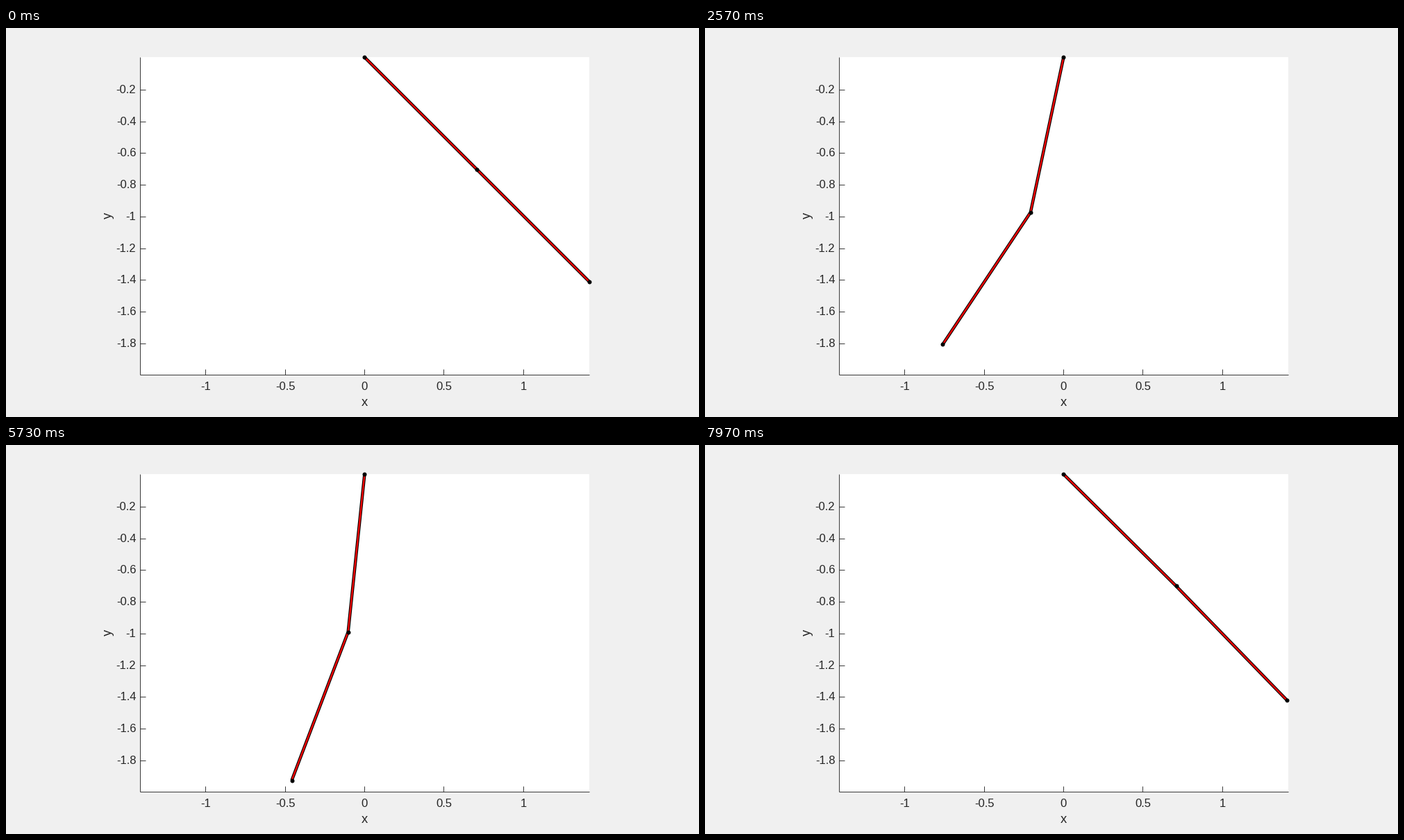
Recreate the animation shown at these times as a matplotlib script. Size 998 by 561 pixels, loop 8000 ms.

```python
import numpy as np
import matplotlib.pyplot as plt
from matplotlib.animation import FuncAnimation

W, H, DPI = 998, 561, 100
POSES, LOOP_MS, TICK_MS = 240, 8000, 20
G, STEP, SUBSTEPS = 9.81, 0.01, 4
X0, Y0, UNIT = 516.4, 42.2, 228.7
INK = "#262626"


def px(size):
    """Pixels to points."""
    return size * 72 / DPI


def slope(s):
    """Double pendulum of two equal uniform rods, one unit long."""
    a, b, u, v = s
    c, d = np.cos(a - b) / 2, np.sin(a - b) / 2
    mass = [[4 / 3, c], [c, 1 / 3]]
    force = [-d * v * v - 1.5 * G * np.sin(a), d * u * u - 0.5 * G * np.sin(b)]
    return np.array([u, v, *np.linalg.solve(mass, force)])


def simulate():
    s = np.array([np.pi / 4, np.pi / 4, 0, 0])
    h = STEP / SUBSTEPS
    angles = []
    for _ in range(POSES):
        angles.append(s[:2])
        for _ in range(SUBSTEPS):
            k1 = slope(s)
            k2 = slope(s + h / 2 * k1)
            k3 = slope(s + h / 2 * k2)
            k4 = slope(s + h * k3)
            s = s + h / 6 * (k1 + 2 * k2 + 2 * k3 + k4)
    return np.array(angles)


fig = plt.figure(figsize=(W / DPI, H / DPI), dpi=DPI, facecolor="#f0f0f0")
ax = fig.add_axes([0, 0, 1, 1])
ax.set(xlim=(0, W), ylim=(H, 0))
ax.axis("off")

# Plot area
left, right, bottom = 193.5, 839.8, 499.5
ax.fill([193, right, right, 193], [42, 42, 500, 500], color="white", lw=0)


def rule(xs, ys):
    ax.plot(xs, ys, color=INK, lw=px(0.9), solid_capstyle="butt")


def label(x, y, text, size=16.67, **kw):
    ax.text(x, y, text, family="Liberation Sans", size=px(size), color=INK,
            va="baseline", **kw)


rule([left, left], [42, 500])
rule([193, right], [bottom, bottom])
for value in np.arange(-2, 3) / 2:
    x = np.floor(X0 + value * UNIT) + 0.5
    rule([x, x], [bottom, bottom - 8])
    label(x, 522, f"{value:g}", ha="center")
for value in np.arange(-9, 0) / 5:
    y = np.round(Y0 - value * UNIT) + 0.5
    rule([left, left + 8], [y, y])
    label(187.3, y + 5.5, f"{value:g}", ha="right")
label(516.5, 545, "x", 18.33, ha="center")
label(152, 270.5, "y", 18.33, ha="center", rotation=90, rotation_mode="anchor")

# Rods and joints
edge, = ax.plot([], [], color="black", lw=px(4.5), solid_capstyle="butt")
core, = ax.plot([], [], color="#f00000", lw=px(2.4), solid_capstyle="butt")
dots, = ax.plot([], [], "o", color="black", ms=px(6), mew=0)

angles = simulate()


def draw(tick):
    # Poses change on a 10 ms clock, rounded to the nearest
    i = int((tick * TICK_MS + 15) * POSES / LOOP_MS)
    xs = X0 + UNIT * np.r_[0, np.cumsum(np.sin(angles[i]))]
    ys = Y0 + UNIT * np.r_[0, np.cumsum(np.cos(angles[i]))]
    for line in (edge, core, dots):
        line.set_data(xs, ys)
    return edge, core, dots


anim = FuncAnimation(fig, draw, frames=LOOP_MS // TICK_MS, interval=TICK_MS,
                     init_func=lambda: draw(0), repeat=True, repeat_delay=0)
plt.show()
```
